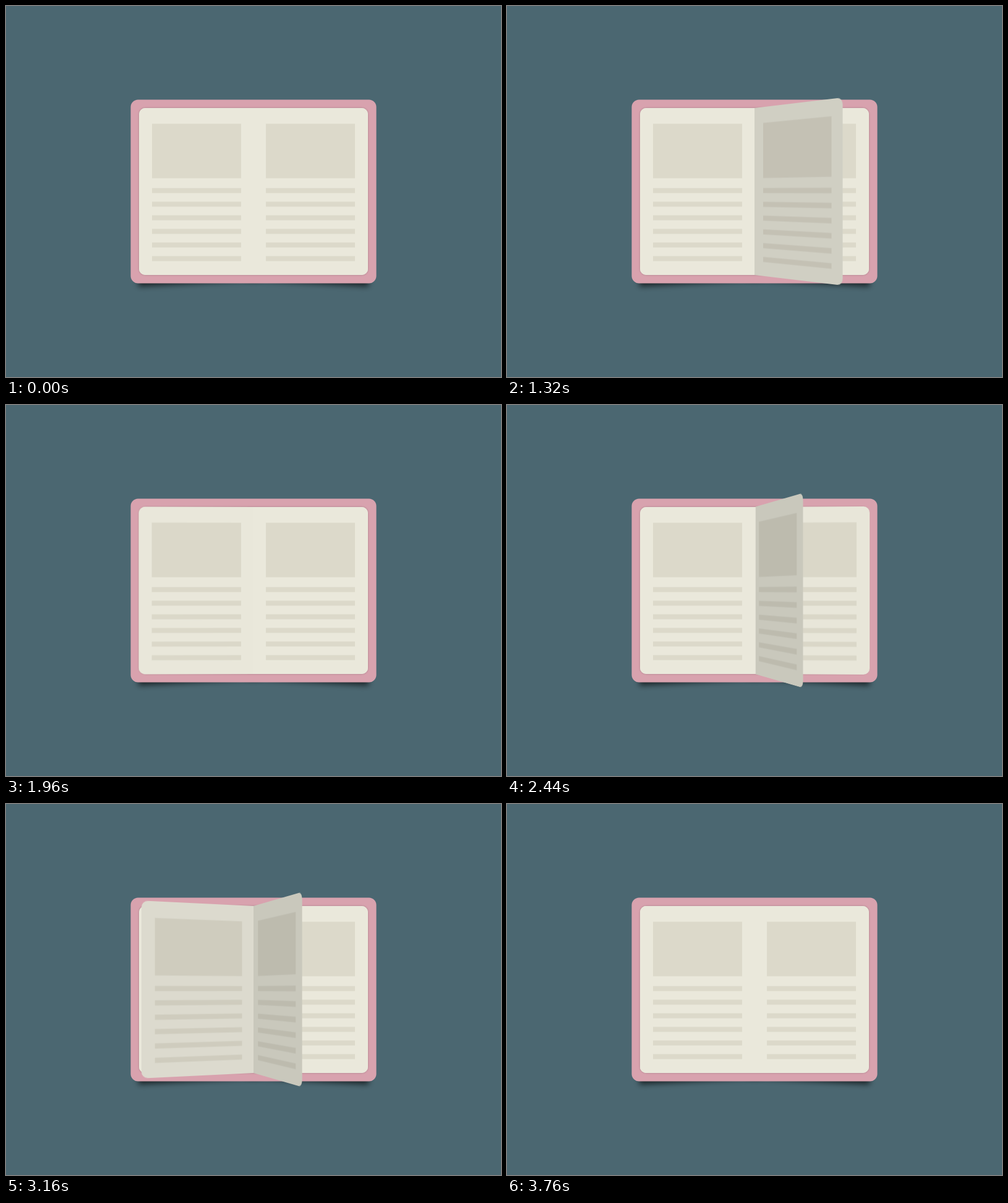
These frames come from a looping animation (800 px wide and 600 px high, 5 s). An HTML page:

```html
<!DOCTYPE html>
<html lang="en">
<head>
<meta charset="utf-8">
<title>Turning pages</title>
<style>
  html, body { margin: 0; width: 100%; height: 100%; overflow: hidden; background: #4b6771; }
  #stage { position: relative; width: 800px; height: 600px; overflow: hidden; }
  #stage > * { position: absolute; }
  #cover { left: 0; top: 0; }
  .lift { fill: #000; fill-opacity: .65; filter: blur(5px); }
  #block {
    left: 215px; top: 165px; width: 370px; height: 270px; border-radius: 10px;
    background: #eae8db; box-shadow: 0 0 3px rgba(0, 0, 0, .25);
  }
  .page {
    left: 400px; top: 165px; width: 185px; height: 270px;
    border-radius: 0 10px 10px 0; background: #eae8db;
    transform-origin: 0 50%; stroke: #dcd9ca;
  }
</style>
</head>
<body>
<div id="stage">
  <svg id="cover" width="800" height="600">
    <g transform="rotate(-3 311 404)"><rect class="lift" x="211.5" y="389" width="198.5" height="59.5"/></g>
    <g transform="rotate(3 489 404)"><rect class="lift" x="390" y="389" width="198.5" height="59.5"/></g>
    <rect x="201.5" y="151.5" width="397" height="297" rx="12" fill="#d8a2ae"/>
  </svg>
  <div id="block"></div>
</div>
<script>
const LOOP = 5000, STEP = 40, TURN = 1050, GAP = 5;
const starts = [962, 1995, 2355, 2715];
const stage = document.getElementById('stage');

function addPage() {
  let lines = '';
  for (let i = 0; i < 6; i++) lines += `M20 ${133.5 + 22 * i}h144`;
  stage.insertAdjacentHTML('beforeend', `<svg class="page">
    <path d="M20 69.5h144" stroke-width="88"/><path d="${lines}" stroke-width="8"/></svg>`);
  return stage.lastElementChild;
}

addPage().style.transform = 'scaleX(-1)';
addPage();
const pages = starts.map(addPage);

// Turning angle in radians, 0 to PI, with sine easing
function angle(start, time) {
  const p = Math.min(1, Math.max(0, (time - start) / TURN));
  return Math.PI * (1 - Math.cos(Math.PI * p)) / 2;
}

function draw(now) {
  const time = Math.floor(now % LOOP / STEP) * STEP;
  const angles = starts.map(s => angle(s, time));
  pages.forEach((page, i) => {
    const a = angles[i], onRight = a < Math.PI / 2, s = page.style;
    s.display = a > 0 && a < Math.PI ? 'block' : 'none';
    s.zIndex = onRight ? 10 - i : 10 + i;
    s.transform = `perspective(1200px) rotateY(${-a}rad)`;
    s.filter = `brightness(${1 - .15 * Math.sin(a)})`;
    // The next rising page covers a sliver at the spine
    s.clipPath = onRight && angles[i + 1] > 0 ? `inset(0 0 0 ${GAP / Math.sin(a)}px)` : 'none';
  });
}

const begin = performance.now();
function tick() {
  draw(performance.now() - begin);
  requestAnimationFrame(tick);
}
tick();
</script>
</body>
</html>
```
